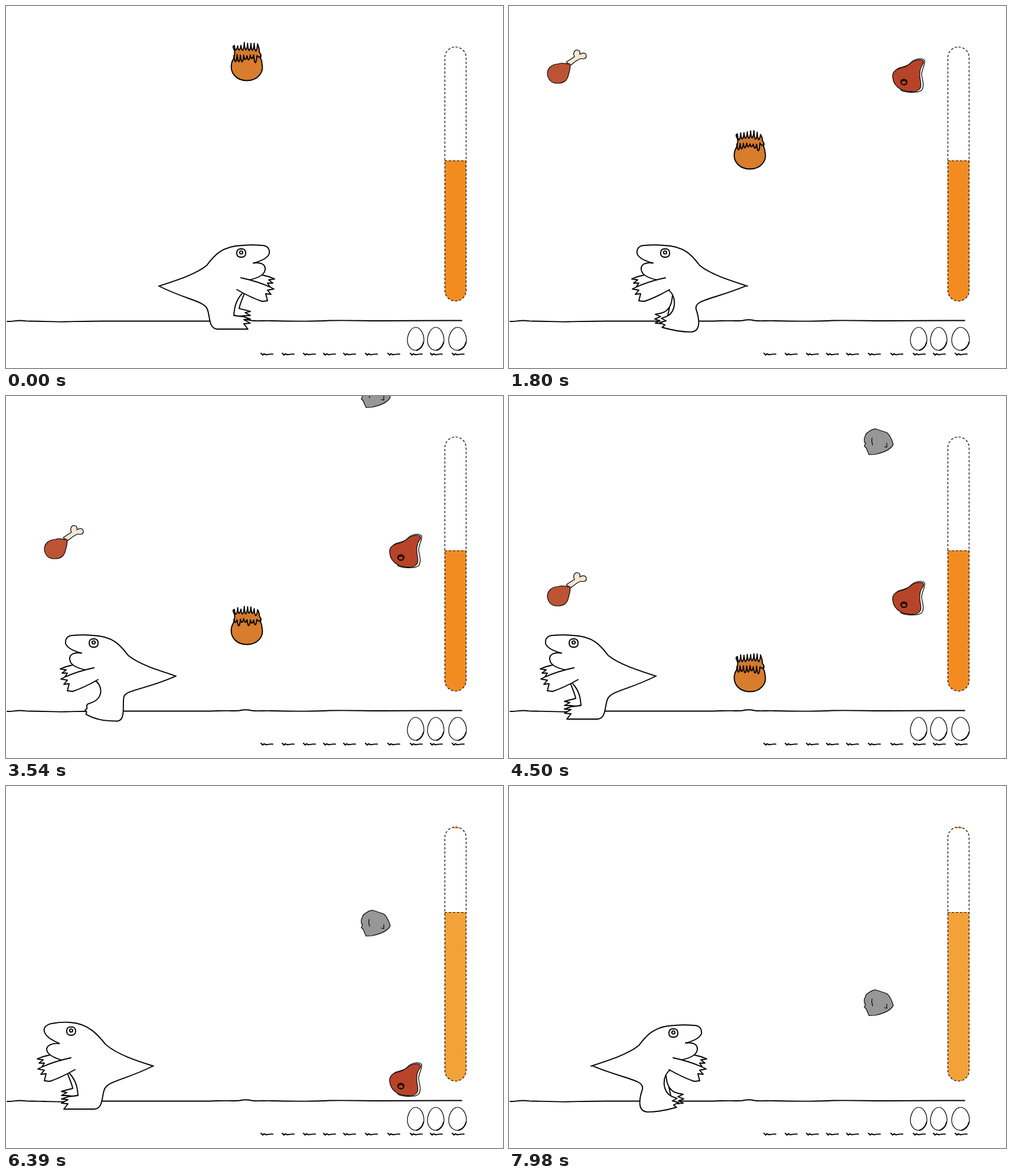
Animation of 842 by 614 pixels, one loop 8 s. Source, as an HTML page:

```html
<!DOCTYPE html>
<html lang="en">
<head>
<meta charset="utf-8">
<title>Hungry dinosaur</title>
<style>
  html, body { margin: 0; width: 100%; height: 100%; overflow: hidden; background: #fff; }
  svg { display: block; width: 100%; height: 100%; }
  .ink { stroke: #000; stroke-width: 1.9; stroke-linejoin: round; stroke-linecap: round; }
  .thin { stroke-width: 1.2; }
  .paper { fill: #fff; }
  .line { fill: none; }
</style>
</head>
<body>
<svg viewBox="0 0 842 614">
  <path class="ink line" d="M2 535C14 535 16 533.5 24 533.5S34 535 40 534.5C70 534.5 75 536 100 535.5S140 534.5 165 534.5H345L360 534C375 533.5 385 534.5 396 533.5C402 532 410 532 416 533.5C425 535 435 533.5 450 534C490 535 520 535 548 533.5C590 533 610 534 640 534C680 534 700 533.5 745 533.5H772"/>
  <g id="marks"></g>
  <g id="eggs"></g>

  <clipPath id="tube"><rect x="743.5" y="69.5" width="36" height="431" rx="18"/></clipPath>
  <g clip-path="url(#tube)"><rect id="level" x="743" width="37" height="300"/></g>
  <path id="glint" d="M757 71h11" stroke="#f2a238" stroke-width="2"/>
  <g fill="none" stroke="#000" stroke-width="1.2" stroke-dasharray="4 3">
    <rect x="743.5" y="69.5" width="36" height="431" rx="18"/>
    <path id="rim" d="M743 0h37"/>
  </g>

  <g id="dino">
    <path class="ink paper" d="M-72 455L-88 459L-98 463L-88 464.5L-95 470L-86 470L-90 476L-70 472L-55 464"/>
    <path id="far" class="ink paper"/>
    <path id="body" class="paper"/>
    <path id="near" class="ink line"/>
    <path id="head" class="ink line"/>
    <path class="ink paper" d="M-41 461C-60 465 -78 471 -91 477L-97 480L-86 482L-92 489L-83 488L-86 500L-77 501C-62 496 -48 489 -34 481"/>
    <g id="eye">
      <rect class="ink paper" x="-49" y="412" width="15" height="14" rx="6"/>
      <circle class="ink paper" cx="-41.5" cy="418" r="2.6"/>
    </g>
  </g>

  <g id="fire" class="ink" stroke-width="1.4">
    <path fill="#d87d2d" d="M388 84C387 88 384 91 382.500 96C378 114 391 126.500 408 126.500S438 114 433.500 97C434 92 431 90 430 84Z"/>
    <path id="flame" fill="#d27b2e"/>
    <path id="drips" class="line"/>
  </g>
  <g id="drum" class="ink thin">
    <path fill="#f3e8d2" d="M97 30L111 21C107 13 113 7 119 11C121 13 120 15 120 17C126 13 131 15 131 20C131 25 126 25 122 24C115 26 109 32 104 36Z"/>
    <path fill="#bc5335" d="M103 33C97 34 92 30 84 33C71 34 65 41 65 50C66 60 72 66 82 66C94 66 99 61 101 51C103 43 105 38 103 33Z"/>
  </g>
  <g id="steak" class="ink thin">
    <path class="paper" d="M653 47C660 36 672 40 679 33C686 24 699 22 704 27C706 33 699 42 699 52C701 62 704 71 699 78C692 83 672 82 664 78Z"/>
    <path fill="#b74429" d="M650 56C649 47 655 42 665 40C678 37 680 29 690 27C700 24 705 29 701 34C695 42 695 52 697 62C699 72 698 77 688 80C672 82 652 76 650 56Z"/>
    <ellipse fill="#b74429" stroke-width="2" cx="669" cy="64" rx="5" ry="4.5"/>
    <path class="line" d="M666 63l3-2 3 2"/>
  </g>
  <g id="rock" class="ink thin">
    <path fill="#979797" d="M602 72L605 64C612 58 617 55 622 56L640 62C645 66 649 75 651 82C648 90 635 96 620 99L610 99.500L605 88L602 85L604 80L602 78Z"/>
    <path class="line" d="M615 71L614.500 76L616 83M640 80V87L636 86"/>
  </g>
</svg>
<script>
const LOOP = 8000, TICK = 60;
const $ = id => document.getElementById(id);
const clamp = v => Math.min(1, Math.max(0, v));

// Poses face left, x is measured from the middle of the animal.
const headDown = 'M98 475C70 466 35 455 17 440C5 424 -8 407 -44 406C-55 405 -65 405 -76 406C-87 406 -90 413 -89 420C-86 428 -74 433 -62 436C-74 434 -83 438 -82 447C-81 458 -66 462 -54 465';
const headUp = 'M99 475C70 466 37 455 18 438C5 422 -12 402 -42 400C-52 399 -62 400 -72 402C-84 405 -88 411 -85 417C-82 426 -70 432 -60 437C-72 436 -83 440 -82 448C-80 457 -64 463 -53 466';

const stand = {
  near: 'M-43 488C-32 500 -30 512 -29 525L-46 527L-57 531L-46 532L-57 538L-46 539L-53 548C-40 548 -20 548 -1 548C14 547 11 525 16 514C22 500 50 499 98 475',
  far: 'M-47 487C-43 498 -39 506 -38 513L-50 516L-57 518L-48 520L-57 525L-47 525L-40 526C-36 526 -32 526 -29 524C-28 515 -32 500 -40 490'
};
const stride = [
  { near: 'M-45 484C-33 488 -25 508 -62 513L-70 516L-62 519L-72 524L-64 526L-71 528L-66 532C-55 545 -45 548 -7 549C4 548 -8 510 8 503C20 500 60 496 100 476',
    far: 'M3 508C5 512 8 520 7 525L1 530L7 535L0 540L3 543L-5 550L2 550C20 549 30 546 40 536C52 524 48 508 27 501' },
  { near: 'M-37 481C-22 490 -22 518 -38 526L-40 527L-48 530L-40 534L-51 537L-42 541L-47 545C-30 550 -15 553 2 553C20 552 16 530 11 515C6 498 40 498 95 475',
    far: 'M-29 492C-30 508 -36 518 -48 521L-58 523L-49 527L-59 531L-50 534L-58 538L-50 539C-45 538 -42 538 -40 536C-38 530 -36 520 -34 510' },
  { near: 'M-40 485C-10 495 2 505 -2 518L-15 521L-5 526L-15 531L-6 534L-13 541L-4 545C20 550 50 540 53 530C55 515 35 505 29 498C50 490 70 484 98 474',
    far: 'M-67 492C-66 500 -65 508 -63 513L-76 510L-85 508L-78 515L-89 518L-85 522L-82 527C-75 538 -60 542 -45 542C-20 542 -17 536 -14 530' },
  { near: 'M-37 486C-25 491 -22 510 -26 524L-29 526L-37 530L-28 535L-37 539L-29 543L-35 550C-20 551 5 549 16 547C32 542 22 528 21 514C18 498 50 492 94 475',
    far: 'M-39 487C-46 500 -45 513 -41 519L-54 526L-64 529L-56 533L-63 538L-56 541L-60 545C-50 546 -42 546 -37 545C-30 540 -30 520 -30 510' }
];

function mix(a, b, w) {
  const to = b.match(/-?[\d.]+/g);
  let i = 0;
  return a.replace(/-?[\d.]+/g, n => (+n + (to[i++] - n) * w).toFixed(2));
}

function leg(side, phase, weight) {
  const p = (phase - Math.floor(phase)) * 4, i = Math.floor(p);
  return mix(stand[side], mix(stride[i][side], stride[(i + 1) % 4][side], p - i), weight);
}

const noise = n => { const s = Math.sin(n * 127.1) * 43758.5453; return s - Math.floor(s); };

// Ragged flame tips above, rounded drips of varying length below.
function drawFlame(t) {
  const seed = Math.floor(t / 120) * 31;
  let top = 'M386 87Q389 78 386 73T387 67', low = 'M386 84';
  for (let i = 0; i < 7; i++) {
    const x = 390 + i * 5.6, arch = Math.sin((i + .5) / 7 * Math.PI);
    const dip = 75 + noise(seed + i) * 3 - arch * 3;
    const tip = 70 - noise(seed + i + 9) * 5 - arch * 5;
    top += `Q${x - 2} ${dip + 2} ${x} ${dip}Q${x + 2} ${dip - 3} ${x + 2.5} ${tip}`;
    const end = 88 + noise(seed + i + 18) * 8;
    low += `Q${x - 2.5} ${end + 3} ${x - .5} ${end}Q${x + 1} ${end - 3} ${x + 1.5} ${82 + noise(seed + i + 27) * 3}`;
  }
  $('flame').setAttribute('d', top + 'Q430 74 429 78Q434 84 431 87');
  $('drips').setAttribute('d', low + 'Q431 90 431 84');
}

function drawDino(t) {
  const k = Math.floor(t / TICK);
  let x, right = false, start = 0, phase = (t - 1050) / 600, idle = false;
  if (k < 9) {
    x = 357 + 4 * k;
    right = true;
    phase = t / 600 + .75;
  } else if (k < 69) {
    x = 390 - 4 * (k - 9);
    start = 450;
  } else if (k < 112) {
    right = t >= 6450;
    x = right ? 153 : 151;
    idle = true;
  } else {
    x = 153 + 4 * (k - 112);
    right = true;
    start = 6720;
    phase = (t - 7080) / 600 + .75;
  }
  const weight = idle ? 0 : clamp((t - start) / 90);
  const lift = idle ? .5 - .5 * Math.cos((t - 4500) / 800 * 2 * Math.PI) : 0;
  const near = leg('near', phase, weight), head = mix(headDown, headUp, lift);
  $('dino').setAttribute('transform', `translate(${x} 0) scale(${right ? -1 : 1} 1)`);
  $('far').setAttribute('d', leg('far', phase, weight));
  $('near').setAttribute('d', near);
  $('head').setAttribute('d', head);
  $('body').setAttribute('d', near + head.replace('M', 'L') + 'Z');
  $('eye').setAttribute('transform', `translate(${lift} ${-4 * lift})`);
}

function drop(id, y, visible) {
  $(id).setAttribute('transform', `translate(0 ${y})`);
  $(id).style.display = visible ? '' : 'none';
}

function render(t) {
  const fall = 5 * Math.floor(t / TICK), fed = t >= 5250;
  drop('fire', fall, fall < 420);
  drop('drum', fall - 85, !fed);
  drop('steak', fall - 85, fall < 550);
  drop('rock', fall - 375, true);
  drawFlame(t);
  drawDino(t);
  const y = fed ? 214 : 262;
  $('level').setAttribute('y', y);
  $('level').setAttribute('fill', fed ? '#f2a238' : '#f28c20');
  $('rim').setAttribute('d', `M743 ${y + .5}h37`);
  $('glint').style.display = fed ? '' : 'none';
}

$('marks').innerHTML = [431, 467, 503, 537, 571, 608, 646, 684, 718, 755].map(x =>
  `<path class="ink line" d="M${x + 1} 589l3 3 2-2 4 1.500c5-1 6-1.500 11-1"/>`).join('');
$('eggs').innerHTML = [694, 728, 765].map((x, i) => {
  const r = i < 2 ? 14 : 15;
  return `<path class="ink thin paper" d="M${x} 545c${r * .62} 0 ${r} 12 ${r} 21s-6 18-${r} 18-${r}-8-${r}-17 ${r * .4}-22 ${r}-22z"/>` +
    `<path class="ink line" d="M${x + r - .5} 570q-3 11-${r - 2} 14"/>`;
}).join('');

(function frame() {
  render(performance.now() % LOOP);
  requestAnimationFrame(frame);
})();
</script>
</body>
</html>
```
